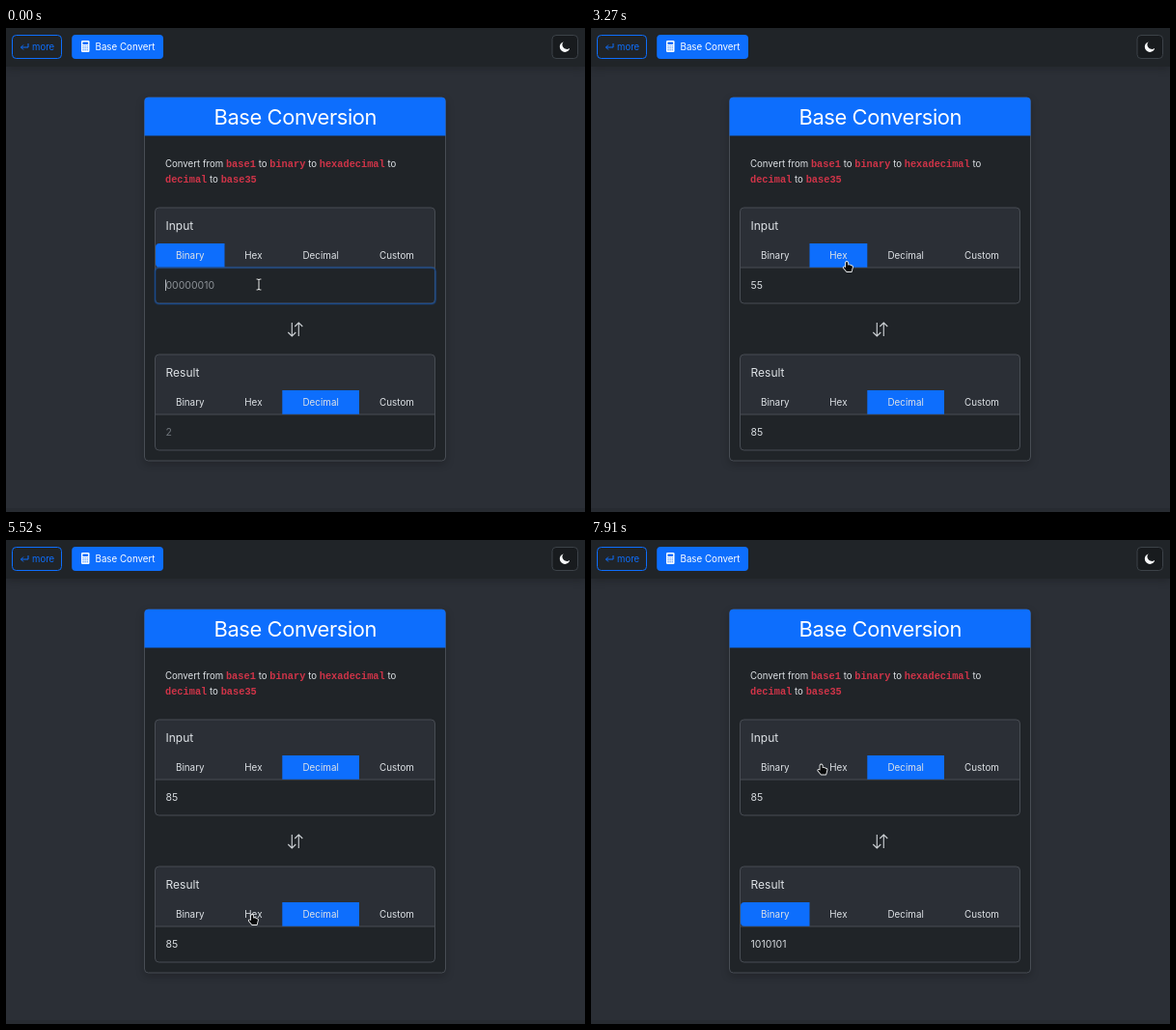
An HTML page with a canvas that plays this animation: 600x501 px, repeating every 8 s.

```html
<!DOCTYPE html>
<html lang="en">
<head>
<meta charset="utf-8">
<title>Base Conversion</title>
<style>
html, body { margin: 0; width: 100%; height: 100%; overflow: hidden; background: #2b2f36; }
canvas { display: block; width: 600px; height: 501px; }
</style>
</head>
<body>
<canvas id="stage"></canvas>
<script>
const LOOP = 8000, FADE = 150, BUSY = 490, KEY_GAP = 90, TURN = 456;
const BLUE = '#0d6efd', TEXT = '#dee2e6', DARK = '#202428', PANEL = '#2b2f36', LINE = '#484d54';
const SANS = 'Inter, "Open Sans", sans-serif', MONO = '"Liberation Mono", monospace';
const LEFT = 165.5;

const canvas = document.getElementById('stage');
const ctx = canvas.getContext('2d');
const dpr = window.devicePixelRatio || 1;
canvas.width = 600 * dpr;
canvas.height = 501 * dpr;

const TABS = ['Binary', 'Hex', 'Decimal', 'Custom'];
const EDGES = [155, 226.5, 286.3, 366, 444];
const BASES = [2, 16, 10];

// Tab choices: [time, tab]
const inputTabs = [[-FADE, 0], [2990, 1], [3800, 2]];
const resultTabs = [[-FADE, 2], [5690, 1], [6610, 0]];
const blurAt = inputTabs[1][0];

// Bursts of typing: [time, count]
const keys = [[30, 3], [880, 1], [1550, 4]]
  .flatMap(([t, n]) => Array.from({ length: n }, (_, i) => t + i * KEY_GAP));
const busy = [...keys, ...resultTabs.slice(1).map(s => s[0])];

// Pointer moves: [from, to, x, y]
const home = [262, 265.5];
const moves = [
  [2390, 2790, 265, 242], [3290, 3750, 322, 239], [4050, 4790, 286, 437],
  [4850, 5380, 255, 388], [5720, 6000, 205, 390], [6200, 6330, 199, 388.5],
  [7110, 7550, 238.5, 232.5]
];

const ease = v => {
  const k = Math.max(0, Math.min(1, v));
  return k * k * (3 - 2 * k);
};
const last = (steps, t) => steps.filter(s => s[0] <= t).pop();

function box(x, y, w, h, r, fill, stroke, width = 1) {
  ctx.beginPath();
  ctx.roundRect(x, y, w, h, r);
  if (fill) { ctx.fillStyle = fill; ctx.fill(); }
  if (stroke) { ctx.strokeStyle = stroke; ctx.lineWidth = width; ctx.stroke(); }
}

function text(str, x, y, size, color = TEXT, align = 'left', font = SANS, weight = 400) {
  ctx.font = `${weight} ${size}px ${font}`;
  ctx.fillStyle = color;
  ctx.textAlign = align;
  ctx.fillText(str, x, y);
  return ctx.measureText(str).width;
}

function stroke(d, color, width) {
  ctx.strokeStyle = color;
  ctx.lineWidth = width;
  ctx.stroke(new Path2D(d));
}

function faded(alpha, draw) {
  ctx.save();
  ctx.globalAlpha = alpha;
  draw();
  ctx.restore();
}

function shadow(alpha, draw) {
  ctx.save();
  ctx.shadowColor = `rgba(0,0,0,${alpha})`;
  ctx.shadowBlur = 8 * dpr;
  ctx.shadowOffsetY = 3 * dpr;
  draw();
  ctx.restore();
}

function navbar() {
  shadow(0.18, () => box(0, 0, 600, 40, 0, DARK));
  box(6.5, 7.5, 51, 24, 4, null, BLUE);
  stroke('M23 16V20H15.5M18 17.5L15.5 20L18 22.5', BLUE, 1);
  text('more', 27, 23, 9.6, BLUE);

  box(68.2, 7, 94.8, 25, 4, BLUE);
  box(78, 13, 8.5, 12, 1.3, '#fff');
  box(79.4, 14.5, 5.7, 2.4, 0.4, BLUE);
  for (let i = 0; i < 9; i++) {
    box(79.4 + (i % 3) * 2.1, 18.2 + Math.floor(i / 3) * 2, 1.2, 1.1, 0.2, BLUE);
  }
  text('Base Convert', 92.5, 23, 9.75, '#fff');

  box(566, 7.5, 26.5, 24, 4, '#181b1e', '#3c4248');
  ctx.fillStyle = '#f8f9fa';
  ctx.beginPath();
  ctx.arc(579.2, 19.5, 5.4, -1.9, 0.45, true);
  ctx.arc(581.2, 17.3, 4.6, 0.95, -2.35);
  ctx.fill();
}

// Words marked with * are set as code
function flow(str, y) {
  let x = 165;
  for (const word of str.split(' ')) {
    x += word[0] === '*'
      ? text(word.slice(1), x, y, 10.3, '#cf3448', 'left', MONO, 700)
      : text(word, x, y, 9.65);
    x += 2.8;
  }
}

function panel(y, title, tabs, t) {
  box(154.5, y, 290, 99, 4, DARK);
  box(154.5, y, 290, 62, [4, 4, 0, 0], PANEL);
  text(title, LEFT, y + 23, 12);
  box(154.5, y, 290, 99, 4, null, LINE);
  stroke(`M155 ${y + 62}H444.5`, LINE, 1);

  const now = last(tabs, t);
  const prev = tabs[tabs.indexOf(now) - 1];
  const mix = ease((t - now[0]) / FADE);
  TABS.forEach((label, i) => {
    const alpha = i === now[1] ? mix : prev && i === prev[1] ? 1 - mix : 0;
    const x = EDGES[i], w = EDGES[i + 1] - x;
    faded(alpha, () => box(x, y + 37, w, 24.7, i ? 0 : [4, 0, 0, 4], BLUE));
    text(label, x + w / 2, y + 52.6, 9.85, TEXT, 'center');
  });
}

function value(str, y, color) {
  return text(str, LEFT, y, 10.5, color);
}

function inputField(t, str, empty) {
  faded(1 - ease((t - blurAt) / FADE), () => {
    box(154.5, 248, 290.5, 37.5, 4, null, 'rgba(13,110,253,.16)', 2.6);
    box(154.5, 248, 290.5, 37.5, 4, null, '#1b4a89');
  });
  const w = value(str, 270, empty ? '#8d9297' : '#d5d9dd');
  const blink = t > 2360 && t < 2790;
  if (t < blurAt && !blink) stroke(`M${LEFT + (empty ? 0 : w)} 260.5V272`, '#c3c8cd', 0.9);
}

function middle(t) {
  if (!busy.some(s => t >= s && t < s + BUSY)) {
    stroke('M296.3 305V319M292.3 315L296.3 319L300.3 315M303.3 319V305M299.3 309L303.3 305L307.3 309', '#ced2d6', 1.1);
    return;
  }
  const gap = (t / TURN - 0.024) * Math.PI * 2;
  ctx.strokeStyle = TEXT;
  ctx.lineWidth = 2.5;
  ctx.beginPath();
  ctx.arc(299.8, 311.5, 9.4, gap + Math.PI / 4, gap + Math.PI * 7 / 4);
  ctx.stroke();
}

function pointerAt(t) {
  let [x, y] = home;
  for (const [from, to, nx, ny] of moves) {
    const k = ease((t - from) / (to - from));
    x += (nx - x) * k;
    y += (ny - y) * k;
  }
  return [x, y];
}

function glyph(d) {
  ctx.lineJoin = 'round';
  stroke(d, '#eceeef', 1.8);
  ctx.fillStyle = '#08090a';
  ctx.fill(new Path2D(d));
}

function pointer(t) {
  const [x, y] = pointerAt(t);
  const onTab = (y > 222 && y < 248) || (y > 374 && y < 400);
  ctx.save();
  ctx.translate(x, y);
  if (onTab) {
    glyph('M-1 1Q0-1 1.2 1V3.6Q3 2.8 4.6 4.2Q6 4 6 5.3L4.8 10H0L-3.2 6.2Q-3.4 4.6-1 6Z');
  } else if (y >= 248 && y < 286) {
    const beam = 'M-2.5-5.5H-1L0-4.5L1-5.5H2.5M0-4.5V4.5M-2.5 5.5H-1L0 4.5L1 5.5H2.5';
    stroke(beam, '#101214', 2.4);
    stroke(beam, '#dfe2e4', 1.1);
  } else {
    glyph('M0 0V9.6L2.2 7.6L3.8 11.2L5.5 10.4L3.9 6.9H6.8Z');
  }
  ctx.restore();
}

function draw(t) {
  ctx.setTransform(dpr, 0, 0, dpr, 0, 0);
  box(0, 0, 600, 501, 0, PANEL);
  box(0, 497, 600, 4, 0, '#272b31');
  navbar();

  shadow(0.25, () => box(143.5, 72, 312, 376, 4, DARK));
  box(143.5, 72, 312, 376, 4, null, LINE);
  box(143.5, 71.7, 312, 39.8, [4, 4, 0, 0], BLUE);
  ctx.letterSpacing = '-0.4px';
  text('Base Conversion', 299.8, 99.5, 21.9, '#fff', 'center');
  ctx.letterSpacing = '0px';
  flow('Convert from *base1 to *binary to *hexadecimal to', 143.5);
  flow('*decimal to *base35', 159.5);

  const count = keys.filter(s => s <= t).length;
  const bits = '01'.repeat(4).slice(0, count);
  const number = parseInt(bits || '10', 2);
  const show = tabs => number.toString(BASES[last(tabs, t)[1]]);
  const entry = t < blurAt ? bits || '00000010' : show(inputTabs);

  panel(186, 'Input', inputTabs, t);
  inputField(t, entry, !count);
  middle(t);
  panel(338, 'Result', resultTabs, t);
  value(show(resultTabs), 422, count ? '#d5d9dd' : '#6f757b');
  pointer(t);
}

const start = performance.now();
function tick() {
  draw((performance.now() - start) % LOOP);
  requestAnimationFrame(tick);
}
tick();
</script>
</body>
</html>
```
